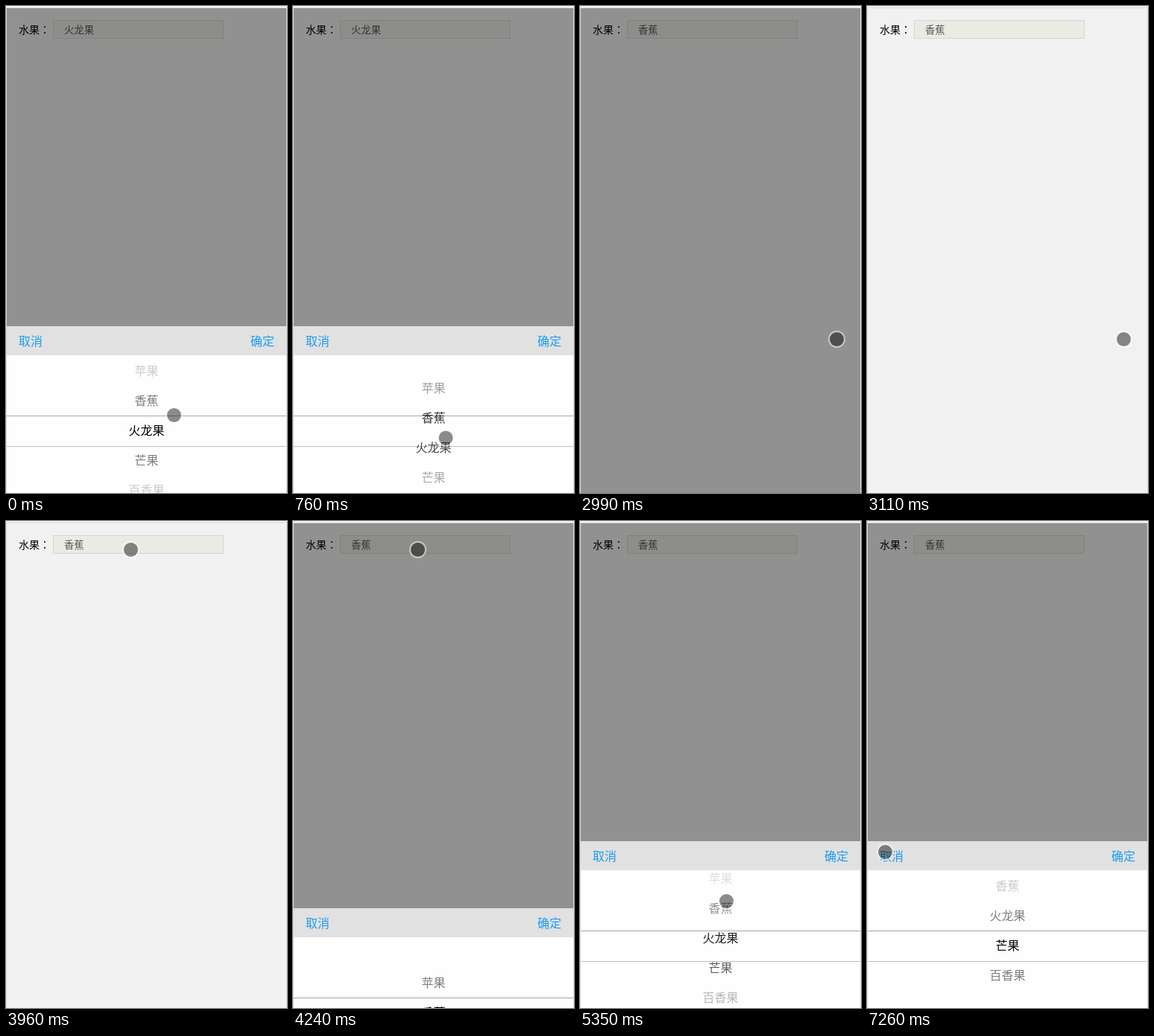
These frames come from a looping animation (377x654 px, 8000 ms). An HTML page:

```html
<!DOCTYPE html>
<html lang="zh-CN">
<meta charset="utf-8">
<style>
  html, body { margin: 0; width: 100%; height: 100%; overflow: hidden; background: #f1f1f1; }
  svg { display: block; width: 377px; height: 654px; }
  text { font-family: "Noto Sans CJK SC", "Noto Sans CJK", sans-serif; font-size: 16px; }
  .label { font-size: 14px; }
  .colon { font-family: "Noto Sans CJK JP", "Noto Sans CJK", sans-serif; }
  .value { font-size: 13.33px; fill: #545454; }
  .action { fill: #1c9cf2; }
  .item { text-anchor: middle; }
</style>
<svg viewBox="0 0 377 654">
  <defs><clipPath id="window"><rect x="1" y="39" width="375" height="265"/></clipPath></defs>
  <path d="M.5 654V2.5H376.5V654" fill="none" stroke="#ddd"/>
  <text class="label" x="17" y="37">水果<tspan class="colon" lang="ja">：</tspan></text>
  <rect x="63.5" y="19.5" width="228" height="24" fill="#ebebe4" stroke="#d6d6ce"/>
  <text class="value" id="value" x="78" y="37"></text>
  <rect id="shade" x="1" y="3" width="375" height="651" fill-opacity=".4"/>
  <g id="panel">
    <rect x="1" width="375" height="304" fill="#fefefe"/>
    <rect x="1" width="375" height="39" fill="#e1e1e1"/>
    <text class="action" x="17" y="26">取消</text>
    <text class="action" x="328" y="26">确定</text>
    <rect x="1" y="120" width="375" height="1" fill="#a6a6a6"/>
    <rect x="1" y="161" width="375" height="1" fill="#bfbfbf"/>
    <g id="list" clip-path="url(#window)"></g>
  </g>
  <g id="pointer">
    <circle r="10.5" fill="none" stroke="#fff" stroke-opacity=".5" stroke-width="2"/>
    <circle r="9.5" fill-opacity=".45"/>
  </g>
</svg>
<script>
const LOOP = 8000, TICK = 120, ROW = 40, CENTER = 140;
const PANEL_TOP = 430, PANEL_HEIGHT = 304;
const CONFIRM = 2990, CLOSED = 3110, OPEN = 4240;
const $ = id => document.getElementById(id);

// Each gesture leads the pointer, and the list when scroll is given, to a new place.
const begin = { x: 225.5, y: 549.5, scroll: -2 * ROW };
const gestures = [
  { at: 130, x: 204.5, y: 557.5 },
  { at: 280, ticks: 5, x: 205, y: 580, scroll: -57 },
  { at: 1440, ticks: 2, x: 205, y: 585, scroll: -52 },
  { at: 1740, ticks: 2, x: 224.5, y: 584.5, scroll: -ROW },
  { at: 2010, ticks: 2, x: 312.5, y: 439.5 },
  { at: 2290, ticks: 3, x: 344.5, y: 447.5 },
  { at: 3510, x: 189.5, y: 128.5 },
  { at: 3660, ticks: 3, x: 167.5, y: 38.5 },
  { at: 4510, x: 165.5, y: 47.5 },
  { at: 4660, ticks: 3, x: 183.5, y: 583.5 },
  { at: 5080, ticks: 3, x: 196.5, y: 510.5, scroll: -90 },
  { at: 5480, ticks: 2, x: 197.5, y: 502.5, scroll: -3 * ROW },
  { at: 5910, ticks: 3, x: 113.5, y: 648 },
  { at: 6680, ticks: 2, x: 24.5, y: 444.5 }
];

const items = ['苹果', '香蕉', '火龙果', '芒果', '百香果'].map(name => {
  const el = document.createElementNS('http://www.w3.org/2000/svg', 'text');
  el.textContent = name;
  el.setAttribute('class', 'item');
  el.setAttribute('x', 188.5);
  $('list').append(el);
  return el;
});

const mix = (a, b, p) => a + (b - a) * p;
const easeOut = p => 1 - (1 - p) ** 3;
const moveTo = (id, x, y) => $(id).setAttribute('transform', `translate(${x} ${y})`);
const fade = d => Math.max(0, d < 1 ? 1 - d / 2 : 0.8 - 0.3 * d);

// Progress jumps once per tick, the first jump being at the start.
const progress = (t, at, ticks = 1) =>
  t < at ? 0 : Math.min(1, (Math.floor((t - at) / TICK) + 1) / ticks);

function pose(t) {
  let { x, y, scroll } = begin;
  for (const g of gestures) {
    const p = progress(t, g.at, g.ticks);
    const q = g.scroll === undefined ? easeOut(p) : p;
    x = mix(x, g.x, q);
    y = mix(y, g.y, q);
    scroll = mix(scroll, g.scroll ?? scroll, q);
  }
  return { x, y, scroll };
}

function draw(t) {
  const { x, y, scroll } = pose(t);
  const shown = t < CONFIRM ? 1 : easeOut(progress(t, OPEN, 3));
  moveTo('pointer', x, y);
  moveTo('panel', 0, Math.round(PANEL_TOP + PANEL_HEIGHT * (1 - shown)));
  items.forEach((el, i) => {
    const offset = i * ROW + scroll;
    el.setAttribute('y', CENTER + 6 + offset);
    el.setAttribute('opacity', fade(Math.abs(offset) / ROW));
  });
  $('value').textContent = t < CONFIRM ? '火龙果' : '香蕉';
  $('shade').style.display = t < CLOSED || t >= OPEN ? '' : 'none';
}

const start = performance.now();
function tick() {
  draw((performance.now() - start) % LOOP);
  requestAnimationFrame(tick);
}
tick();
</script>
</html>
```
